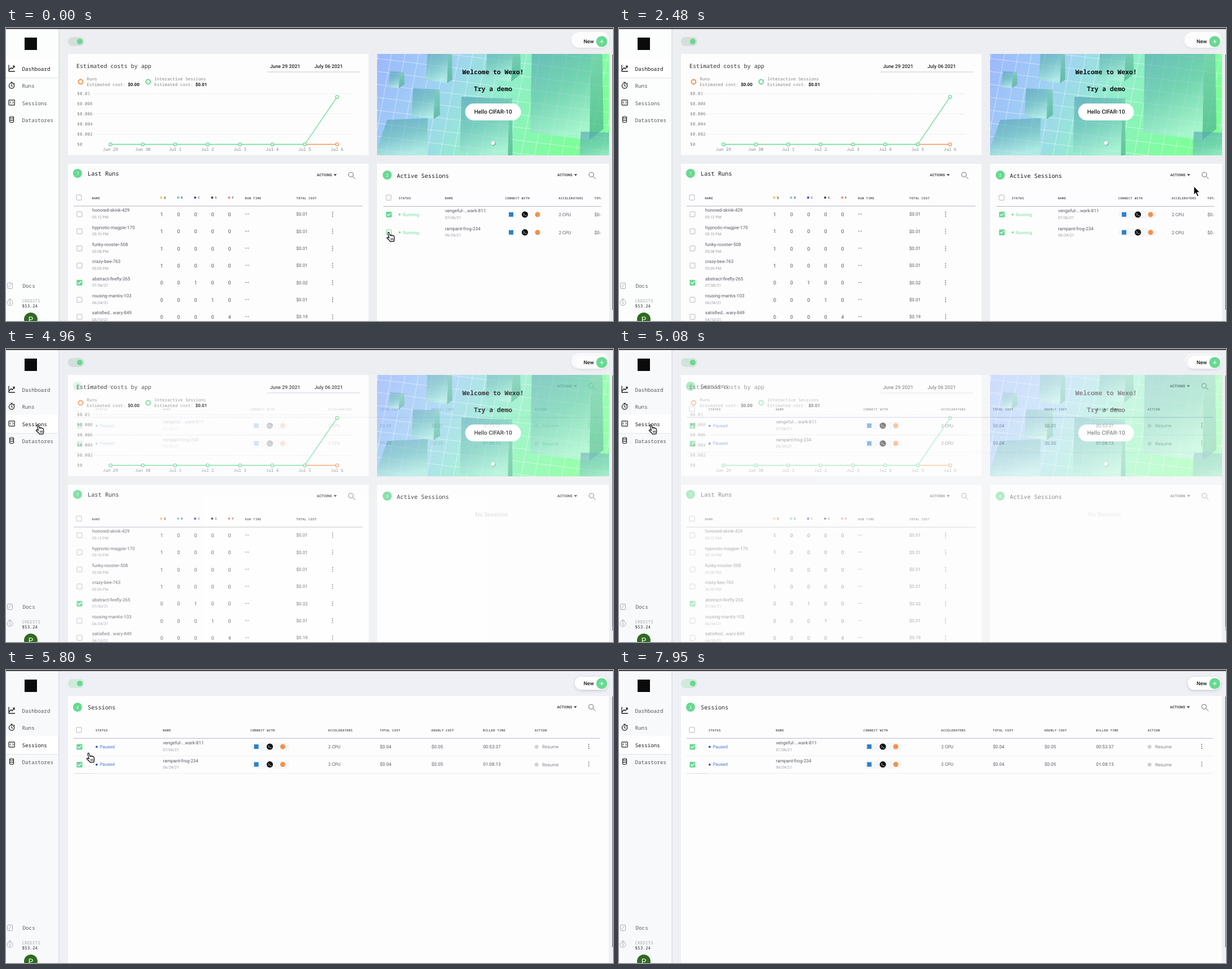
An HTML page for the animation above (8430 ms loop, 1078 by 520 pixels).

```html
<!DOCTYPE html>
<html lang="en">
<head>
<meta charset="utf-8">
<title>Sessions dashboard</title>
<style>
html, body { margin: 0; width: 100%; height: 100%; overflow: hidden; background: #edeef1; }
svg { display: block; width: 1078px; height: 520px; font-family: Roboto, Arial, sans-serif; text-rendering: geometricPrecision; }
.m { font-family: "Noto Sans Mono", "DejaVu Sans Mono", monospace; }
.h { font: 700 5.4px "Noto Sans Mono", "DejaVu Sans Mono", monospace; letter-spacing: .41px; fill: #555; }
.line { fill: none; stroke-linecap: round; stroke-linejoin: round; }
</style>
</head>
<body>
<svg id="stage" viewBox="0 0 1078 520" xmlns="http://www.w3.org/2000/svg"></svg>
<script>
const LOOP = 8430;
const GREEN = '#67d992', INK = '#16181b', TEXT = '#565a60', FAINT = '#9a9ca1';

// Drawing helpers
const text = (x, y, s, size, fill = TEXT, more = '') =>
  `<text x="${x}" y="${y}" font-size="${size}" fill="${fill}" ${more}>${s}</text>`;
const mono = (x, y, s, size, fill = TEXT, more = '') => text(x, y, s, size, fill, 'class="m" ' + more);
const head = (x, y, s) => `<text class="h" x="${x}" y="${y}">${s}</text>`;
const rect = (x, y, w, h, fill, more = '') =>
  `<rect x="${x}" y="${y}" width="${w}" height="${h}" fill="${fill}" ${more}/>`;
const dot = (x, y, r, fill, more = '') => `<circle cx="${x}" cy="${y}" r="${r}" fill="${fill}" ${more}/>`;
const path = (d, stroke, width = 1, more = '') =>
  `<path class="line" d="${d}" stroke="${stroke}" stroke-width="${width}" ${more}/>`;
const group = (id, body, more = '') => `<g id="${id}" ${more}>${body}</g>`;
const MID = 'text-anchor="middle"', BOLD = 'font-weight="700"', MEDIUM = 'font-weight="500"';

// Interface parts
const box = (x, y, stroke = '#b4b7bd') =>
  rect(x - 4.5, y - 4.5, 9, 9, '#fff', `rx="1" stroke="${stroke}"`);
const ticked = (x, y) => rect(x - 5, y - 5, 10, 10, GREEN, 'rx="1.2"') +
  path(`M${x - 2.8} ${y}l2 2.1l3.8-4.2`, '#fff', 1.3);
const badge = (x, y, n) => dot(x, y, 8, GREEN) + text(x, y + 2.6, n, 7.4, '#fff', MID);
const kebab = (x, y) => [-3.5, 0, 3.5].map(d => dot(x, y + d, .9, '#666')).join('');
const tools = (x, y) => text(x, y, 'ACTIONS', 6.4, '#444', BOLD) +
  `<path d="M${x + 29.8} ${y - 3.6}h5.6l-2.8 3.6z" fill="#444"/>` +
  path(`M${x + 64} ${y + .8}l4 4`, '#666') +
  dot(x + 60.6, y - 2.6, 4.1, 'none', 'stroke="#666"');
const apps = (a, b, c, y) =>
  rect(a - 4, y - 4, 8, 8, '#2b82c9') +
  dot(b, y, 5.6, '#111') + path(`M${b - 2.6} ${y - 1.8}l2 1.7l-2 1.7M${b + .4} ${y + 2}h2.2`, '#fff', .8) +
  dot(c, y, 4.5, '#f0924a');
const pills = (x, w, ys) => ys.map(y => rect(x, y - 7, w, 14, '#f5f6f8', 'rx="7"')).join('');
const toggle = fill => rect(110, 16, 29, 16, fill, 'rx="8"') + dot(131, 24, 5, GREEN);
const panel = (x, y, w, h) => rect(x, y, w, h, '#fdfdfe');

const sidebarText = (active) => ['Dashboard', 'Runs', 'Sessions', 'Datastores'].map((s, i) =>
  mono(28.5, 76 + 30.3 * i, s, 9.25, i === active ? INK : '#55585e')).join('');

function sidebarIcons() {
  const k = '#222', g = '#a9abb4';
  return path('M5 66V77H15.5M6 74L9 70.5L11 72.5L15 67.5M12.5 67.5H15V70', k, 1.3) +
    dot(10, 102.5, 4.6, 'none', `stroke="${k}" stroke-width="1.3"`) +
    path('M8.5 96.3H11.5M10 100V102.5L11.5 103.5M14 98L15 99', k, 1.2) +
    rect(5, 127.8, 10.2, 9, 'none', `stroke="${k}" stroke-width="1.2" rx=".8"`) +
    path('M8.5 130.5L7 132.2L8.5 134M11.7 130.5L13.2 132.2L11.7 134', k) +
    path('M6.5 158.5C6.5 156.5 13.5 156.5 13.5 158.5S6.5 160.5 6.5 158.5V166C6.5 168 13.5 168 13.5 166V158.5M6.5 162.2C6.5 164.2 13.5 164.2 13.5 162.2', k, 1.2) +
    rect(2.5, 452.5, 9, 10, 'none', `stroke="${g}" rx="1"`) + path('M4.5 460.5L9.5 454.5', g) +
    dot(7, 487.5, 5, 'none', `stroke="${g}"`) + path('M5 481H9', g) + text(7, 490, '$', 7, g, MID);
}

function sidebar() {
  const row = y => rect(0, y, 92, 33, '#fff') + rect(0, y + 32.5, 92, 1.2, '#e5e7ec');
  return group('navDash', rect(0, 2, 94, 518, '#fcfdfd') + rect(93.4, 2, 1.2, 518, '#c8dcd3') +
      row(55.5) + sidebarText(0)) +
    group('navSess', rect(0, 2, 94, 518, '#f8f9fb') + rect(93.4, 2, 1.4, 518, '#d7d7e9') +
      row(116.5) + sidebarText(2)) +
    rect(33, 17, 22, 22, '#0b0b0c') + sidebarIcons() +
    mono(29.5, 460.5, 'Docs', 9.25) +
    mono(28.5, 487, 'CREDITS', 7.7, '#a4a6ab') + mono(28.5, 496, '$53.24', 7.7, '#333') +
    dot(44, 517, 12, '#2f6b20') + text(44, 521.5, 'P', 13.5, '#fff', MID);
}

function chart() {
  const px = i => 185.5 + 57.5 * i, base = 206.5;
  let out = panel(110, 46, 534, 179.5) +
    mono(125, 71.3, 'Estimated costs by app', 10.08, '#333') +
    text(468.7, 70.5, 'June 29 2021', 8.8, '#222', MEDIUM) +
    text(547.7, 70.5, 'July 06 2021', 8.8, '#222', MEDIUM) +
    rect(464, 77.5, 165, 1, '#c6cad6');
  [[132.5, 'Runs', '$0.00', '#f39552'], [252.5, 'Interactive Sessions', '$0.01', GREEN]].forEach(([x, name, cost, c]) => {
    out += dot(x, 95.5, 3.9, '#fff', `stroke="${c}" stroke-width="2"`) +
      mono(x + 11, 93.2, name, 7.65, '#858585') + mono(x + 11, 102.6, 'Estimated cost:', 7.65, '#858585') +
      text(x + 84, 102.6, cost, 7.9, '#111', BOLD);
  });
  ['$0.01', '$0.008', '$0.006', '$0.004', '$0.002', '$0'].forEach((s, i) => {
    const y = 116.5 + 18 * i;
    out += mono(126.3, y + 2.8, s, 7.65, '#858585');
    if (i < 5) out += i % 2
      ? [1, 3, 5, 7].map(n => dot(px(n), y, .6, '#d8d8d8')).join('')
      : path(`M156 ${y}H615`, '#dedfe2', .8, 'stroke-dasharray="1.5 3"');
  });
  out += path(`M${px(6)} ${base}H${px(7)}`, '#f39552', 1.3) +
    path(`M${px(0)} ${base}H${px(6)}L${px(7)} 122.3`, GREEN, 1.3);
  ['Jun 29', 'Jun 30', 'Jul 1', 'Jul 2', 'Jul 3', 'Jul 4', 'Jul 5', 'Jul 6'].forEach((s, i) => {
    const ring = (y, c) => dot(px(i), y, 2.7, '#fff', `stroke="${c}" stroke-width="1.3"`);
    out += mono(px(i), 218, s, 7.6, '#858585', MID) +
      (i < 7 ? ring(base, GREEN) : ring(base, '#f39552') + ring(122.3, GREEN));
  });
  return out;
}

// Front face from (x, y) to (x+w, y+h), with a side of depth d
function cube(x, y, w, h, d, tilt = 6) {
  const r = x + w, b = y + h;
  return `<path d="M${r} ${y + tilt / 3}L${r + d} ${y + d * .3}L${r + d * 1.1} ${b - d}L${r - 3} ${b}z" fill="url(#side)"/>` +
    `<path d="M${x + 3} ${y}L${r} ${y + tilt / 3}L${r - 3} ${b}L${x} ${b - tilt}z" fill="url(#front)"/>`;
}

function banner() {
  let mesh = '';
  for (let i = 0; i < 25; i++) mesh += `M${640 + i * 24} 30L${600 + i * 24} 240`;
  for (let i = -3; i < 12; i++) mesh += `M650 ${30 + i * 23}L1080 ${82 + i * 23}`;
  return `<g clip-path="url(#bannerClip)">` + rect(659, 46, 412, 180, 'url(#sky)') +
    path(mesh, '#fff', .8, 'opacity=".62"') +
    cube(679, 77, 21, 30, 7, 2) + cube(720, 107, 42, 55, 8) + cube(746, 34, 40, 64, 6) +
    cube(852, 30, 48, 65, 13) +
    `<path d="M677 163L749 160L747 226H655z" fill="url(#front)"/>` +
    cube(806, 122, 88, 108, 5, 10) + cube(931, 36, 108, 163, 20, 14) + cube(1018, 184, 60, 60, 4) +
    '</g>' +
    mono(865, 82.3, 'Welcome to Wexo!', 11.35, '#0c0f10', MID + ' ' + BOLD) +
    mono(865, 112, 'Try a demo', 11.35, '#0c0f10', MID + ' ' + BOLD) +
    rect(815.5, 134, 99, 30, '#fff', 'rx="15"') +
    text(865, 152.2, 'Hello CIFAR-10', 10, INK, MID + ' ' + MEDIUM) +
    dot(865.8, 205, 3.6, '#6f9c8b') + dot(865, 204.2, 3.2, '#fff');
}

function runs() {
  const rows = [
    ['honored-skink-429', '05:12 PM', '10000', '$0.01'],
    ['hypnotic-magpie-170', '05:10 PM', '10000', '$0.01'],
    ['funky-rooster-508', '05:08 PM', '10000', '$0.01'],
    ['crazy-bee-763', '05:05 PM', '10000', '$0.01'],
    ['abstract-firefly-265', '07/06/21', '00100', '$0.02'],
    ['rousing-mantis-103', '06/24/21', '00010', '$0.01'],
    ['satisfied...wary-849', '04/10/21', '00004', '$0.19']];
  const hues = { Q: '#f4c445', R: GREEN, C: '#4b45e6', S: '#4a4a4a', F: '#f28d70' };
  let out = panel(110, 241, 534, 280) + badge(127, 258, 7) + mono(145, 262.3, 'Last Runs', 10.3, INK, MEDIUM) +
    tools(552, 262.8) + box(129.5, 300.8) +
    head(152.5, 303.8, 'NAME') + head(424.5, 303.8, 'RUN TIME') + head(515.5, 303.8, 'TOTAL COST') +
    rect(120, 315.5, 513, 1.1, '#b9bcc6');
  Object.keys(hues).forEach((s, i) => {
    out += dot(275.5 + 30.2 * i, 301, 2.1, hues[s]) + head(280.5 + 30.2 * i, 303.2, s);
  });
  rows.forEach(([name, when, counts, cost], i) => {
    const y = 330.5 + 30.35 * i;
    out += (i === 4 ? ticked : box)(130.5, y) +
      text(153, y - 4.2, name, 8.1) + text(153, y + 7.3, when, 6.8, FAINT) +
      [...counts].map((n, k) => text(276.5 + 30.15 * k, y + 3.3, n, 9, '#555', MID)).join('') +
      path(`M425.3 ${y - .4}h1.8M429.3 ${y - .4}h1.8`, '#777', 1) +
      text(515.5, y + 2.7, cost, 8.1) + kebab(580, y);
  });
  return out;
}

const names = [['vengeful-...wark-811', '07/06/21'], ['rampant-frog-234', '06/24/21']];

function active() {
  const ys = [331, 362.7];
  const list = badge(677, 261, 2) + box(679.5, 301) + head(697.5, 303.8, 'STATUS') + head(779.5, 303.8, 'NAME') +
    head(886.5, 303.8, 'CONNECT WITH') + head(981.5, 303.8, 'ACCELERATORS') + head(1045, 303.8, 'TOTAL') +
    rect(670, 316, 387, 1.1, '#b9bcc6') +
    group('pillPart', pills(929, 26, ys)) + group('pillFull', pills(887, 68, ys)) +
    ticked(680, 331) + box(680, 362.7, GREEN) + group('tick', ticked(680, 362.7)) +
    names.map(([name, when], i) => {
      const y = ys[i];
      return dot(699, y, 1.7, GREEN) + text(704.7, y + 2.8, 'Running', 7.9, '#77dc9e') +
        text(779.7, y - 4, name, 8.1) + text(779.7, y + 7.6, when, 6.8, FAINT) +
        apps(897, 921.5, 944, y) + text(981.7, y + 2.8, '2 CPU', 7.9) + text(1045, y + 2.8, '$0.04', 8.1);
    }).join('');
  return panel(659, 241, 412, 280) + mono(694, 265.6, 'Active Sessions', 10.3, INK, MEDIUM) + tools(979, 262.8) +
    group('list', list, 'clip-path="url(#listClip)"') +
    group('empty', badge(677, 261, 0) + text(862.3, 296.7, 'No Sessions', 10.5, '#d3d5d9', MID)) +
    group('menu', rect(975, 273, 73, 74, '#fff', 'rx="2" filter="url(#soft)"') +
      text(984, 292.5, 'Pause', 8.1) + text(984, 317, 'Delete', 8.1));
}

function sessions() {
  const cols = { STATUS: 159, NAME: 278.5, 'CONNECT WITH': 434, ACCELERATORS: 572, 'TOTAL COST': 664,
    'HOURLY COST': 755.5, 'BILLED TIME': 847, ACTION: 939 };
  let out = rect(95, 2, 983, 518, '#eff0f5') + toggle('#cfeadb') +
    rect(1010, 12, 59, 23, '#fff', 'rx="11.5" filter="url(#soft)"') +
    panel(110, 46, 960.5, 475) + badge(127, 66, 2) + mono(145, 70.4, 'Sessions', 10.3, '#2b2d31') +
    tools(978.5, 67.8) + box(129.5, 106.3) +
    Object.entries(cols).map(([s, x]) => head(x, 109.2, s)).join('') +
    rect(120, 120.6, 935, 1.5, '#cfcada') + rect(120, 152, 935, 1, '#eceef2') +
    rect(120, 183, 935, 1, '#eceef2') + rect(120, 183.2, 37, 1, '#dcdee4') + pills(435, 68, [136.2, 167.8]);
  names.forEach(([name, when], i) => {
    const y = 136 + 31.6 * i;
    out += ticked(130.5, y + .5) + dot(161, y + .3, 1.9, '#2c58bb') + text(166.7, y + 2.8, 'Paused', 7.9, '#4a73c8') +
      text(278.7, y - 4, name, 8.1) + text(278.7, y + 7.6, when, 6.8, FAINT) + apps(444.5, 468.5, 491.5, y) +
      text(572.3, y + 2.6, '2 CPU', 7.9) + text(664, y + 2.6, '$0.04', 8.1) + text(755.7, y + 2.6, '$0.05', 8.1) +
      text(847.3, y + 2.6, ['00:53:37', '01:08:13'][i], 8.1) +
      dot(942.2, y + .3, 2.8, 'none', 'stroke="#999" stroke-width=".8"') + dot(942.2, y + .3, 1.1, '#999') +
      text(952.3, y + 2.9, 'Resume', 8.1, '#85878c') + kebab(1035, y - .5);
  });
  return out + rect(1076.8, 47, 1.2, 445, '#66686d');
}

const dashboard = () => rect(95, 2, 983, 518, '#edeef1') + toggle('#d4dedb') +
  rect(1004, 7, 67, 28, '#fcfcfd', 'rx="14" filter="url(#faint)"') +
  chart() + banner() + runs() + active() + group('bar', rect(1076.8, 47, 1.2, 453, '#66686d'));

const stops = list => list.map(([o, c, a = 1]) => `<stop offset="${o}" stop-color="${c}" stop-opacity="${a}"/>`).join('');
const shadow = (id, blur, alpha) => `<filter id="${id}" x="-30%" y="-50%" width="160%" height="200%">
  <feDropShadow dx="0" dy="1.5" stdDeviation="${blur}" flood-color="#56607a" flood-opacity="${alpha}"/></filter>`;

document.getElementById('stage').innerHTML = `<defs>
  <linearGradient id="sky" x1="0" y1=".1" x2="1" y2=".35">${stops([[0, '#9db9fc'], [.3, '#a0d2f3'], [.55, '#93ecce'], [.8, '#85f8ac'], [1, '#7cff97']])}</linearGradient>
  <linearGradient id="front" x1=".1" y1="0" x2=".4" y2="1">${stops([[0, '#4f9fb0', .62], [.5, '#68bdb5', .62], [1, '#b4f1e0', .7]])}</linearGradient>
  <linearGradient id="side" x1="0" y1="0" x2="0" y2="1">${stops([[0, '#72c8ae', .75], [1, '#4fb491', .75]])}</linearGradient>
  <clipPath id="bannerClip"><rect x="659" y="46" width="412" height="180"/></clipPath>
  <clipPath id="listClip"><rect x="659" y="241" width="398" height="279"/></clipPath>
  ${shadow('soft', 2.5, .28)}${shadow('faint', 1.5, .12)}</defs>` +
  group('dash', dashboard()) + group('sess', sessions()) + sidebar() +
  text(1025.8, 27.2, 'New', 9.2, INK, MEDIUM) + dot(1058, 24, 9.8, GREEN) + path('M1055 24h6M1058 21v6', '#fff', 1.1) +
  rect(0, 0, 1078, 1.8, '#303135') +
  group('cursor',
    group('arrow', '<path d="M0 0V14.8L3.4 11.6L6 17.8L8.4 16.8L5.8 10.7H10.3Z" fill="#000" stroke="#fff" stroke-width=".9"/>') +
    group('hand', '<path d="M2.2 2.2C1.6 .4 3.8 -.3 4.5 1.4L6.3 6.2C6.6 5 8.4 5 8.7 6.3C9.2 5.4 10.7 5.5 11 6.8C11.7 6.2 13 6.6 13.2 7.8L13.8 11C14 13 13.2 14 13 16.6L6.6 17.2C6 15.4 3.2 13.2 .8 11.2C-.2 10 1 9 2.6 9.6L4.3 10.6Z" fill="#fff" stroke="#000" stroke-width="1.2"/>' +
      path('M7.6 11.4l.3 3M9.5 11.2l.2 3M11.4 11l.1 3', '#000', .8), 'transform="translate(-3 0)"'));

// Timing: times in ms become keyframe percentages
const css = [];
const pct = ms => (ms / LOOP * 100).toFixed(3) + '%';
function animate(id, frames) {
  css.push(`@keyframes ${id} {${frames.join('')}} #${id} { animation: ${id} ${LOOP}ms step-end infinite; }`);
}
function fade(id, ...keys) {
  const last = keys[keys.length - 1][1];
  animate(id, [...keys, [LOOP, last]].map(([ms, o]) => `${pct(ms)} { opacity: ${o}; }`));
}

fade('tick', [0, 0], [120, 1]);
fade('pillPart', [0, 0], [940, 1]);
fade('pillFull', [0, 0], [1540, 1]);
fade('menu', [0, 0], [1540, .3], [1660, .7], [1780, 1], [2120, .5], [2240, 0]);
fade('list', [0, 1], [3190, 0]);
fade('empty', [0, 0], [3190, 1]);
fade('bar', [0, 1], [940, 0], [2480, 1], [3540, 0], [4130, 1]);
fade('sess', [0, 0], [4960, .2], [5080, .52], [5200, 1]);
fade('navDash', [0, 1], [4960, 0]);
fade('navSess', [0, 0], [4960, 1]);
fade('hand', [0, 1], [120, 0], [1060, 1], [2120, 0], [4600, 1], [6040, 0]);
fade('arrow', [0, 0], [120, 1], [1060, 0], [2120, 1], [4600, 0], [6040, 1]);

// Pointer moves: first jump, last jump, number of jumps, x, y
const moves = [
  [120, 940, 8, 978, 271], [1060, 1180, 2, 991, 262], [1540, 1890, 4, 1021, 281],
  [2720, 3540, 8, 935, 372], [3780, 3900, 2, 908, 384], [4020, 4130, 2, 264, 205],
  [4370, 4720, 4, 56, 134], [5440, 5800, 4, 146, 147], [5920, 6280, 4, 176, 235],
  [6760, 7000, 3, 490, 330], [7240, 7470, 3, 1011, 446], [7710, 7950, 3, 1026, 524]];
const at = (ms, x, y, ease) =>
  `${pct(ms)} { transform: translate(${x}px, ${y}px); animation-timing-function: ${ease}; }`;
let px = 679, py = 362;
const track = [at(0, px, py, 'step-end')];
for (const [first, last, n, x, y] of moves) {
  const start = first - (last - first) / (n - 1);
  track.push(at(start, px, py, `steps(${n}, end)`), at(last, x, y, 'step-end'));
  [px, py] = [x, y];
}
track.push(at(LOOP, px, py, 'step-end'));
animate('cursor', track);

const style = document.createElement('style');
style.textContent = css.join('\n');
document.head.append(style);
</script>
</body>
</html>
```
